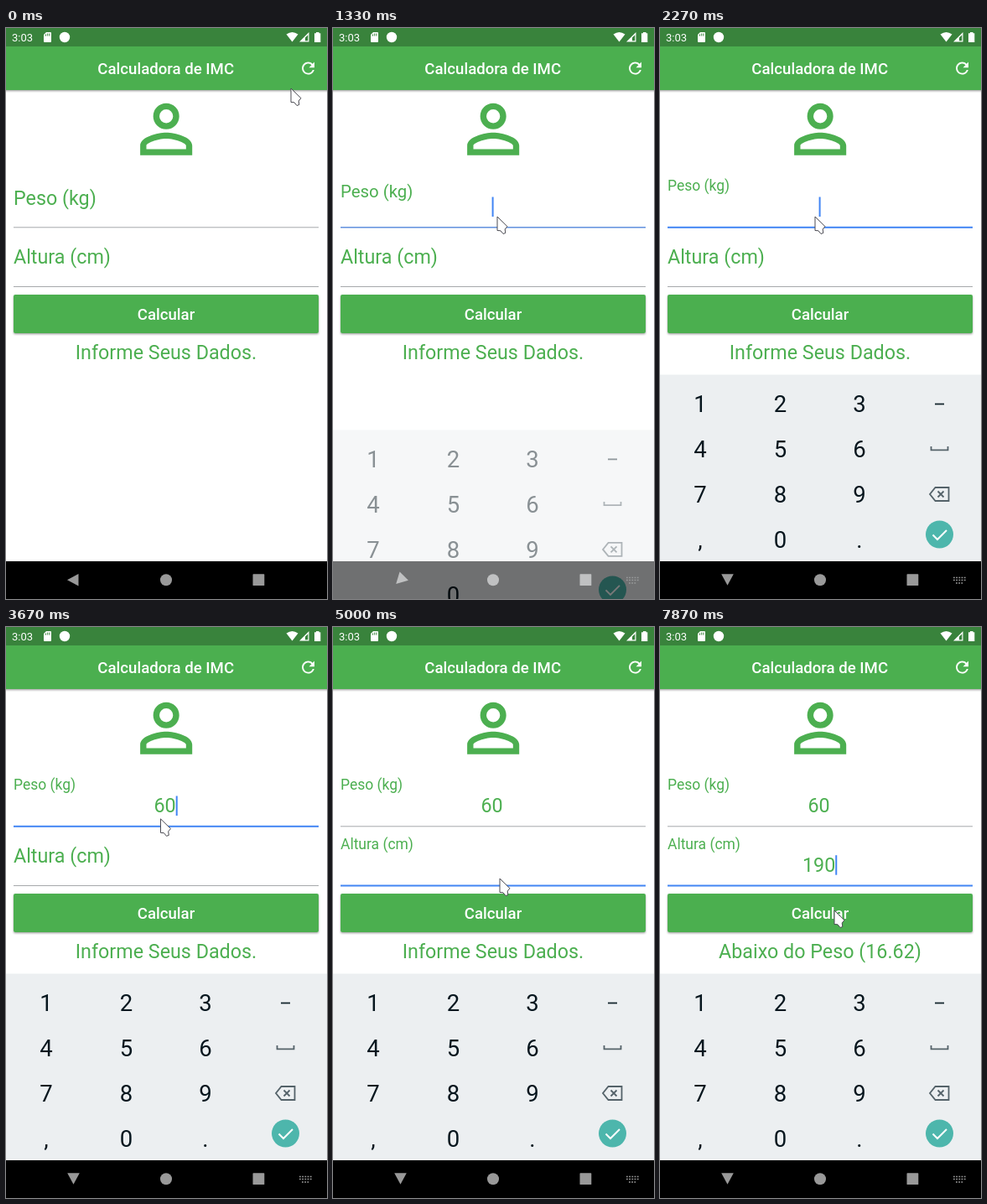
An HTML page for the animation above (8 s loop, 383 by 681 pixels).

```html
<!DOCTYPE html>
<html lang="pt">
<head>
<meta charset="utf-8">
<title>Calculadora de IMC</title>
<style>
html, body { margin: 0; width: 100%; height: 100%; overflow: hidden; background: #fff }
svg { display: block; width: 100vw; height: 100vh; font-family: Roboto, sans-serif }
.green { fill: #4caf50; font-size: 23.3px }
.bold { fill: #fff; font-size: 18.6px; font-weight: 500 }
.mid { text-anchor: middle }
#keys text { fill: #07161e; font-size: 27.5px; text-anchor: middle }
</style>
</head>
<body>
<svg viewBox="0 0 383 681">
  <defs>
    <filter id="soft" x="-10%" y="-30%" width="120%" height="170%">
      <feDropShadow dx="0" dy="1.2" stdDeviation="1.3" flood-opacity=".38"/>
    </filter>
    <clipPath id="btn"><rect x="9" y="318" width="364" height="46" rx="2"/></clipPath>
  </defs>
  <rect width="383" height="681" fill="#fff"/>
  <rect x="-40" width="463" height="74" fill="#4caf50" filter="url(#soft)"/>
  <rect width="383" height="22" fill="#39833c"/>

  <!-- status bar -->
  <g fill="#fff">
    <text x="7" y="16" font-size="13">3:03</text>
    <path d="M48 5H53Q54 5 54 6V16Q54 17 53 17H46Q45 17 45 16V8Z"/>
    <path d="M47.5 7.5v2M49.7 6.5v3M51.9 6.5v3" stroke="#39833c"/>
    <circle cx="70" cy="11" r="6.2"/>
    <path d="M334.5 7.5Q341.500 2.500 348.500 7.500L341.500 16.500Z"/>
    <path d="M350 16.500L361.500 5V16.500Z"/>
    <path d="M357 11.500L360.300 8.200V15.300H357Z" fill="#39833c"/>
    <path d="M368 6.300H370V5H373.500V6.300H375.300V17H368Z"/>
  </g>

  <text class="bold mid" x="190.7" y="55">Calculadora de IMC</text>
  <path fill="#fff" transform="translate(349.400 36.900) scale(.931)" d="M17.65 6.35C16.2 4.9 14.21 4 12 4c-4.42 0-7.99 3.58-7.99 8s3.57 8 7.99 8c3.73 0 6.84-2.55 7.73-6h-2.08c-.82 2.33-3.04 4-5.65 4-3.31 0-6-2.69-6-6s2.69-6 6-6c1.66 0 3.14.69 4.22 1.78L13 11h7V4z"/>
  <path fill="#4caf50" fill-rule="evenodd" transform="translate(144.600 74.200) scale(3.880)" d="M12 5.9a2.1 2.1 0 1 1 0 4.200a2.1 2.1 0 1 1 0-4.200M12 14.9c2.97 0 6.1 1.46 6.1 2.1v1.1H5.9V17c0-.64 3.13-2.1 6.1-2.1M12 4a4 4 0 1 0 0 8a4 4 0 1 0 0-8M12 13c-2.67 0-8 1.34-8 4v3h16v-3c0-2.66-5.33-4-8-4z"/>

  <text class="green" id="label0">Peso (kg)</text>
  <text class="green" id="label1">Altura (cm)</text>
  <rect id="line0" x="9" width="364"/>
  <rect id="line1" x="9" width="364"/>
  <text class="green mid" id="value0" x="189.600" y="221.300"/>
  <text class="green mid" id="value1" x="189.600" y="292"/>
  <rect id="caret" width="2" height="23.500" fill="#4285f4"/>

  <rect x="9" y="318" width="364" height="46" rx="2" fill="#4caf50" filter="url(#soft)"/>
  <g clip-path="url(#btn)"><circle id="ripple" cx="209" cy="340" fill="#fff"/></g>
  <text class="bold mid" x="191" y="348">Calcular</text>
  <text class="green mid" id="result" x="191" y="395"/>

  <!-- navigation bar and keyboard -->
  <rect y="636" width="383" height="45"/>
  <g fill="#999">
    <path id="back" d="M-7.500 0L6-7.300V7.300Z"/>
    <circle cx="191" cy="658.300" r="7"/>
    <rect x="294.500" y="651.300" width="13.800" height="13.800" rx=".7"/>
    <path id="switch" d="M350 655.500H365M350 658.500H365M353 662H362" stroke="#999" stroke-width="1.600" stroke-dasharray="1.800 1.400"/>
  </g>
  <g id="keys">
    <rect y="413.500" width="383" height="222.500" fill="#eceff1"/>
    <g fill="none" stroke="#546269" stroke-width="1.800">
      <path d="M328 448.500H339" stroke="#15262e"/>
      <path d="M323.500 499V503.300H343.500V499"/>
      <path d="M328.500 548H344.500V564H328.500L322 556ZM331.500 552.500L338.500 559.500M338.500 552.500L331.500 559.500"/>
    </g>
    <circle cx="333.500" cy="604" r="16.500" fill="#4db6ac"/>
    <path d="M325.500 604.500L331 610L342 599" fill="none" stroke="#fff" stroke-width="2"/>
  </g>

  <path id="mouse" d="M0 0V16.500L4 16.800L7 20.500L9.800 19.500L9.200 15L12 11.700Z" fill="#fff" stroke="#4a4a52" stroke-linejoin="round"/>
</svg>
<script>
const $ = id => document.getElementById(id);
const set = (id, attrs) => { for (const k in attrs) $(id).setAttribute(k, attrs[k]); };
const clamp = v => Math.max(0, Math.min(1, v));
const smooth = v => (v = clamp(v)) * v * (3 - 2 * v);
const mix = (a, b, p) => `rgb(${a.map((v, i) => Math.round(v + (b[i] - v) * clamp(p)))})`;
const grey = [166, 169, 171], blue = [66, 133, 244], dusk = [90, 122, 118];

[...'123456789,0.'].forEach((key, i) => {
  const text = document.createElementNS('http://www.w3.org/2000/svg', 'text');
  set.call(null, 'keys', {});
  text.setAttribute('x', [48, 143.5, 238][i % 3]);
  text.setAttribute('y', 458 + 54 * Math.floor(i / 3));
  text.textContent = key;
  $('keys').append(text);
});

// All times below are ticks of 1/15 s.
const path = [[1, 340, 72], [12, 201, 219], [14, 198, 222], [16, 196, 225], [24, 196, 225],
  [27, 185, 225], [54, 185, 225], [59, 180, 262], [63, 191, 300], [68, 191, 300], [71, 199, 300],
  [102, 199, 300], [107, 207, 334], [108, 207, 334], [110, 208, 338], [120, 208, 338]];
const caretOn = [[19, 27], [34, 48], [55, 63], [68, 75], [82, 95], [102, 110], [117, 120]];

function mouseAt(n) {
  const i = Math.max(1, path.findIndex(p => p[0] >= n));
  const [t0, x0, y0] = path[i - 1], [t1, x1, y1] = path[i];
  const p = smooth((n - t0) / (t1 - t0));
  return [x0 + (x1 - x0) * p, y0 + (y1 - y0) * p];
}

function field(i, p, focus, color) {
  const y = i * 70.7;
  set(`label${i}`, { transform: `translate(9 ${210.5 + y - 16.3 * p}) scale(${1 - p / 4})` });
  set(`line${i}`, { y: 237.3 + y - focus * .5, height: 1 + focus, fill: color });
}

function draw(n) {
  const p0 = smooth((n - 18) / 4);
  const p1 = n < 68 ? 0 : smooth((n - 66.6) / 4);
  if (n < 68) field(0, p0, p0, mix(grey, blue, p0 * 1.4));
  else field(0, 1, clamp(.5 - p1 / 2), mix(dusk, grey, (p1 - .28) * 1.4));
  field(1, p1, p1, mix(grey, blue, p1));

  const weight = n < 37 ? '' : n < 40 ? '6' : '60';
  const height = n < 82 ? '' : n < 84 ? '1' : n < 87 ? '19' : '190';
  $('value0').textContent = weight;
  $('value1').textContent = height;
  const second = n >= 68;
  set('caret', {
    x: 189.6 + 6.55 * (second ? height : weight).length,
    y: second ? 272.2 : 201.5,
    opacity: caretOn.some(([a, b]) => n >= a && n < b) ? 1 : 0
  });

  const k = clamp((n - 18) / 5);
  set('keys', { transform: `translate(0 ${183 * (1 - k) ** 2})`, opacity: clamp(k * 1.18) });
  set('back', { transform: `translate(80.500 ${658.3 - p0}) rotate(${-90 * p0})` });
  set('switch', { opacity: p0 });

  const r = n - 113;
  const pressed = r > 0 && r < 5;
  set('ripple', { r: pressed ? r * 50 : 0, opacity: pressed ? .25 - r * .045 : 0 });
  $('result').textContent = n < 116 ? 'Informe Seus Dados.' : 'Abaixo do Peso (16.62)';
  set('mouse', { transform: `translate(${mouseAt(n)})` });
}

const start = performance.now();
function loop() {
  const t = (performance.now() - start) % 8000;
  draw(Math.min(119, Math.floor((t + 5) * .015)));
  requestAnimationFrame(loop);
}
loop();
</script>
</body>
</html>
```
